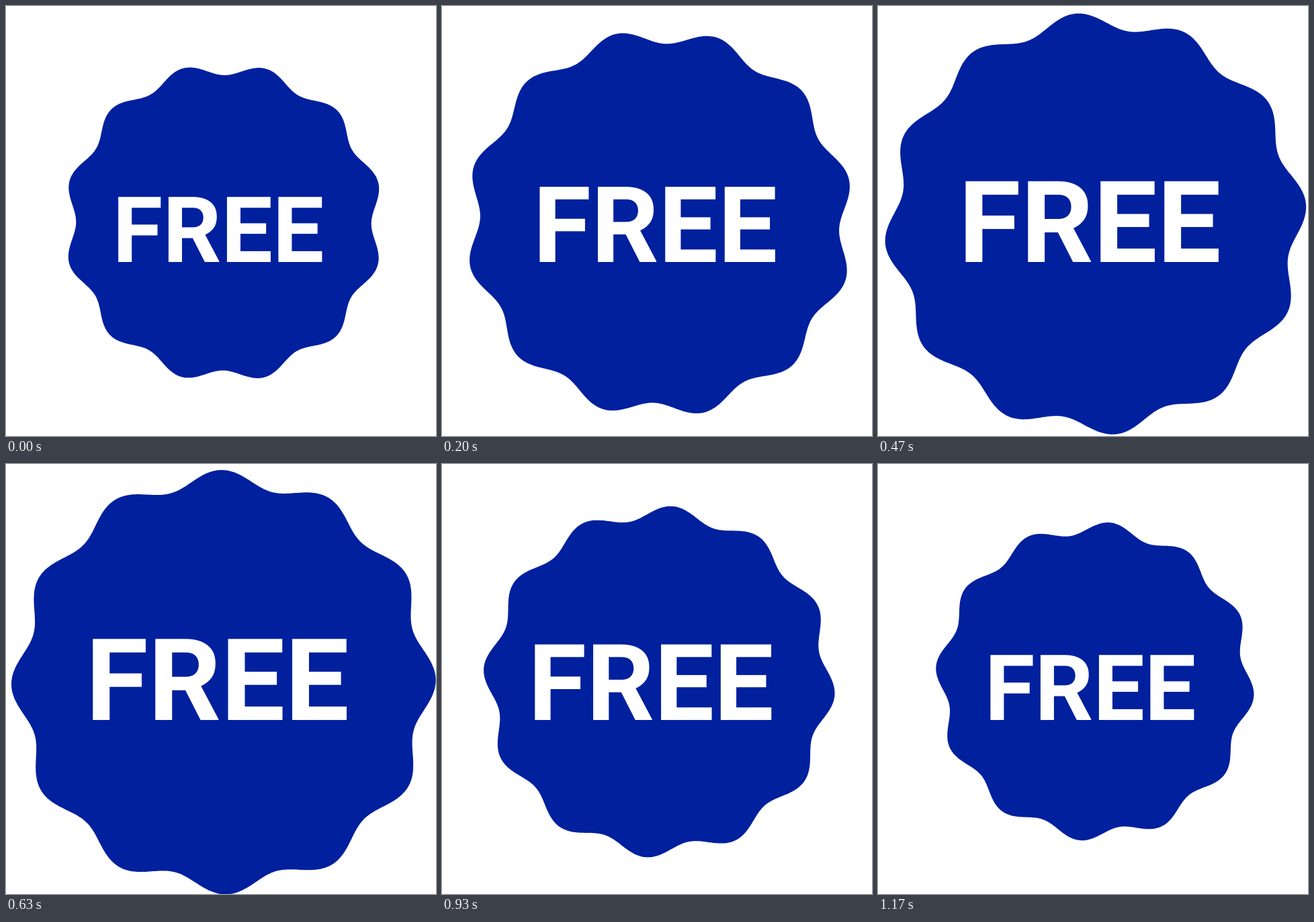
An HTML page that plays this animation: 640 px wide and 640 px high, repeating every 1210 ms.

```html
<!DOCTYPE html>
<html lang="en">
<head>
<meta charset="utf-8">
<title>Free badge</title>
<style>
  html, body {
    margin: 0;
    width: 100%;
    height: 100%;
    overflow: hidden;
    background: #fff;
  }
  svg {
    display: block;
    width: 100%;
    height: 100%;
  }
  #badge, #label {
    animation-duration: 1210ms;
    animation-iteration-count: infinite;
    animation-timing-function: linear;
  }
  #badge {
    fill: #00209e;
    transform-box: view-box;
    transform-origin: 0 0;
    animation-name: drift, swell, turn;
  }
  #label {
    fill: #fff;
    font: 700 136.1px Roboto, sans-serif;
    text-rendering: geometricPrecision;
    transform-box: view-box;
    transform-origin: 167px 380.8px;
    animation-name: slide, grow;
  }
  @keyframes drift {
    0% { translate: 324px 322.7px; }
    48.35% { translate: 323.9px 324.8px; }
    99.17%, 100% { translate: 322.8px 323.6px; }
  }
  @keyframes swell {
    0% { scale: 1; animation-timing-function: cubic-bezier(.333, .87, .667, 1); }
    48.35% { scale: 1.331; }
    49.59% { scale: 1.331; animation-timing-function: cubic-bezier(.76, 0, .24, 1); }
    99.17%, 100% { scale: 1; }
  }
  @keyframes turn {
    0% { rotate: .3deg; animation-timing-function: cubic-bezier(.37, 0, .4, 1); }
    99.17%, 100% { rotate: 20.5deg; }
  }
  @keyframes slide {
    0% { translate: 0 0; animation-timing-function: cubic-bezier(.333, .667, .667, 1); }
    48.35% { translate: -38.3px 0; animation-timing-function: cubic-bezier(.333, 0, .667, .08); }
    96.69%, 100% { translate: 0 0; }
  }
  @keyframes grow {
    0% { scale: 1; animation-timing-function: cubic-bezier(.333, .8, .667, 1); }
    48.35% { scale: 1.249; animation-timing-function: cubic-bezier(.333, 0, .667, .333); }
    96.69%, 100% { scale: 1; }
  }
</style>
</head>
<body>
<svg viewBox="0 0 640 640">
  <path id="badge"/>
  <text id="label" x="158.7" y="380.8">FREE</text>
</svg>
<script>
  // Wavy circle with a notch at the top
  const LOBES = 12, RADIUS = 228.4, WAVE = 9, STEPS = 720;
  const points = Array.from({ length: STEPS }, (_, i) => {
    const a = i / STEPS * 2 * Math.PI;
    const r = RADIUS - WAVE * Math.cos(LOBES * a);
    return (r * Math.sin(a)).toFixed(2) + ' ' + (-r * Math.cos(a)).toFixed(2);
  });
  document.getElementById('badge').setAttribute('d', 'M' + points.join('L') + 'Z');
</script>
</body>
</html>
```
